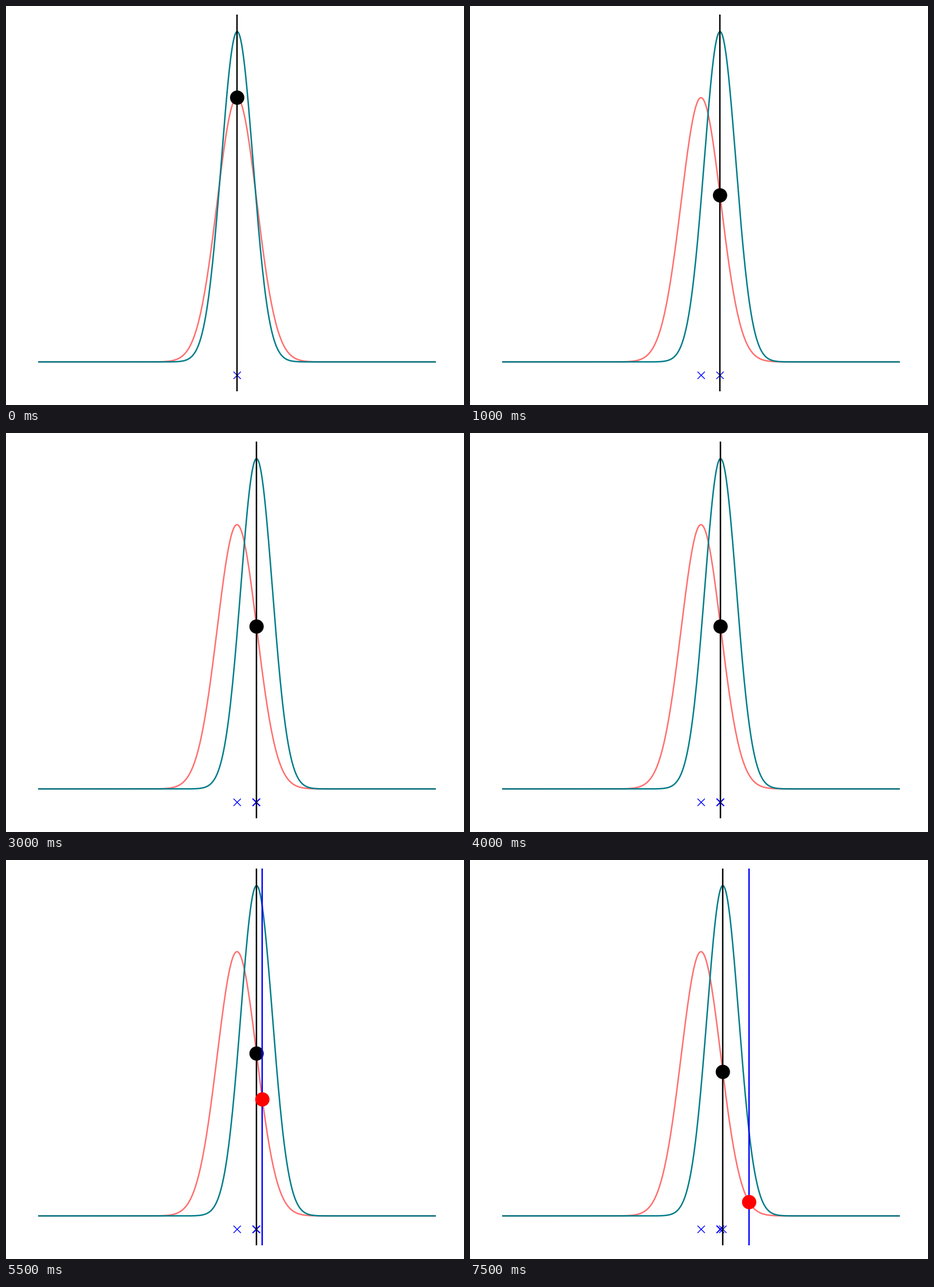
A matplotlib script that plays this animation: 801x699 px, repeating every 8000 ms.

```python
import numpy as np
import matplotlib.pyplot as plt
from matplotlib.animation import FuncAnimation
from matplotlib.patches import Circle

W, H, DPI = 801, 699, 100
PT = 72 / DPI                      # points per pixel
X0, X_UNIT = 404, 34.65            # pixel of x = 0, pixels per unit
Y0, Y_UNIT = 623.5, 1160.5         # pixel of density = 0, pixels per unit
WALK_SD = 0.8
START = 0.009
# Proposed position and whether it is accepted
PROPOSALS = [(0.961, True), (0.987, True), (1.154, False), (1.977, False),
             (2.193, False), (1.280, False), (1.102, True), (2.430, False)]


def pdf(x, mean=0.0, sd=1.0):
    return np.exp(-0.5 * ((x - mean) / sd) ** 2) / (sd * np.sqrt(2 * np.pi))


def to_px(x):
    return X0 + X_UNIT * x


def to_py(density):
    return Y0 - Y_UNIT * density


fig = plt.figure(figsize=(W / DPI, H / DPI), dpi=DPI, facecolor="white")
ax = fig.add_axes([0, 0, 1, 1])
ax.set_xlim(0, W)
ax.set_ylim(H, 0)
ax.axis("off")

xs = np.linspace(-10, 10, 400)
ax.plot(to_px(xs), to_py(pdf(xs)), color="#ff6f6e", lw=2.5 * PT, zorder=1)
walk, = ax.plot([], [], color="#007c89", lw=2.5 * PT, zorder=2)
crosses, = ax.plot([], [], color="blue", lw=1.4 * PT,
                   solid_capstyle="butt", zorder=3)


def make_pin(line_color, dot_color, zorder):
    line, = ax.plot([], [], color=line_color, lw=2.5 * PT,
                    solid_capstyle="butt", zorder=zorder)
    dot = ax.add_patch(Circle((0, 0), 12.5, fc=dot_color, lw=0,
                              zorder=zorder + 1))
    return line, dot


def set_pin(pin, x):
    line, dot = pin
    line.set_data([to_px(x)] * 2, [15, 675])
    dot.center = to_px(x), to_py(pdf(x))


def set_visible(pin, on):
    for artist in pin:
        artist.set_visible(on)


def cross_path(samples, y=647, r=6.4):
    px, py = [], []
    for x in samples:
        c = to_px(x)
        px += [c - r, c + r, np.nan, c - r, c + r, np.nan]
        py += [y - r, y + r, np.nan, y + r, y - r, np.nan]
    return px, py


current = make_pin("black", "black", 4)
proposal = make_pin("blue", "red", 6)


def update(i):
    step, proposing = divmod(i, 2)
    samples = [START] + [x for x, accepted in PROPOSALS[:step] if accepted]
    state = samples[-1]
    walk.set_data(to_px(xs), to_py(pdf(xs, state, WALK_SD)))
    crosses.set_data(*cross_path(samples))
    set_pin(current, state)
    set_pin(proposal, PROPOSALS[step][0])
    set_visible(proposal, bool(proposing))
    return walk, crosses, *current, *proposal


anim = FuncAnimation(fig, update, frames=2 * len(PROPOSALS), interval=500,
                     init_func=lambda: update(0), repeat=True, repeat_delay=0)
plt.show()
```
